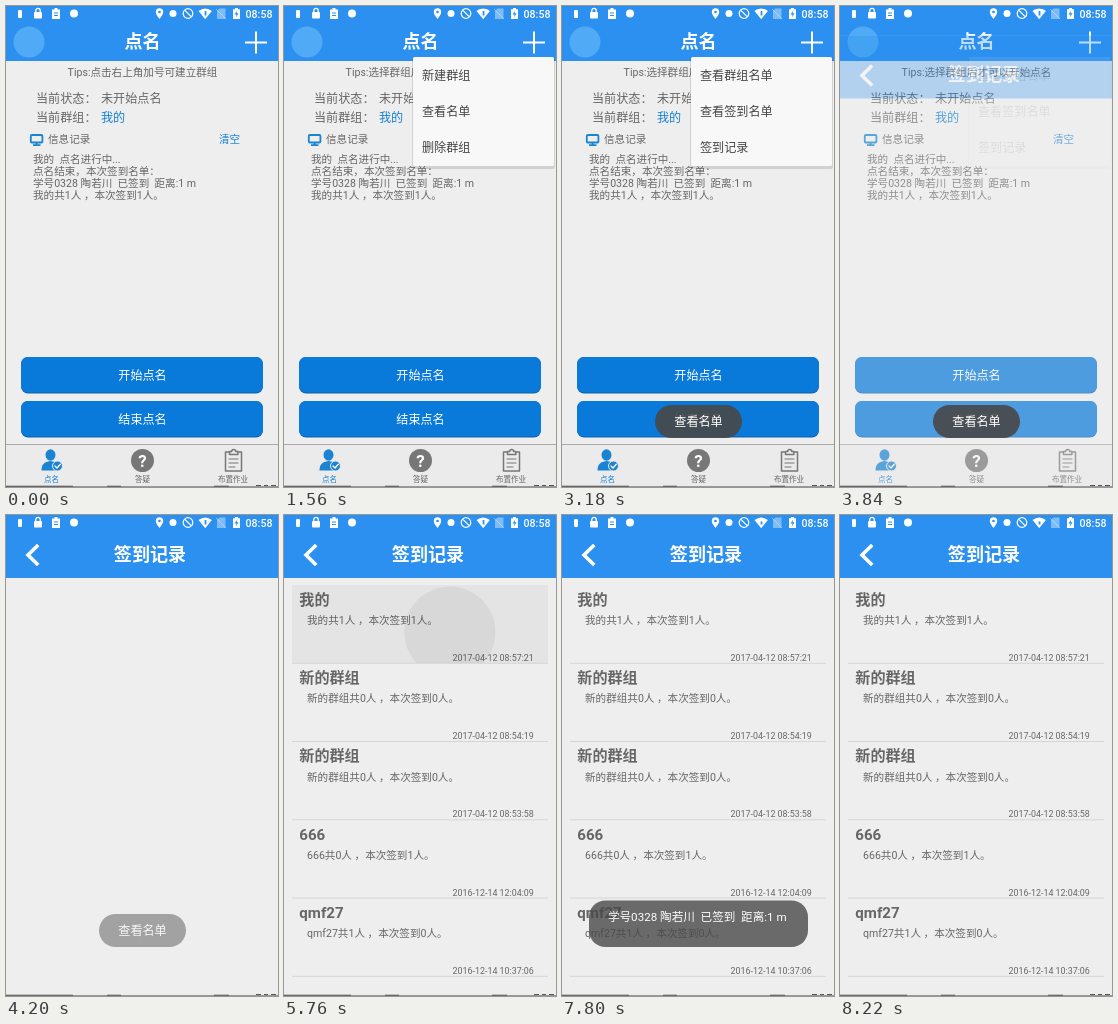
Recreate the animation shown at these times as an HTML page. Size 272 by 481 pixels, loop 8.76 s.

```html
<!DOCTYPE html>
<html lang="zh-CN">
<head>
<meta charset="utf-8">
<title>点名</title>
<style>
html, body { margin: 0; width: 100%; height: 100%; overflow: hidden; background: #eee; }
svg { display: block; width: 272px; height: 481px; }
text { font-family: Roboto, "Noto Sans CJK SC", "Noto Sans CJK", sans-serif; fill: #666; white-space: pre; }
.mid { text-anchor: middle; }
.title { font-size: 18.1px; font-weight: 700; fill: #fff; }
.label { font-size: 12.1px; }
.small { font-size: 10.58px; }
.tab { font-size: 7.56px; }
.group { font-size: 15.1px; font-weight: 700; }
.date { font-size: 8.9px; }
.blue { fill: #1580d6; }
.white { fill: #fff; }
.menu { font-size: 12.1px; fill: #444; }
.line { fill: none; stroke-linecap: round; stroke-linejoin: round; }
</style>
</head>
<body>
<svg viewBox="0 0 272 481">
  <defs><clipPath id="rowClip"><rect x="8" y="70" width="256" height="78"/></clipPath></defs>

  <g id="home">
    <rect width="272" height="481" fill="#eee"/>
    <rect width="272" height="55" fill="#2b90ef"/>
    <circle cx="23" cy="36" r="15.5" fill="#50aaf6"/>
    <text class="title mid" x="136.5" y="42">点名</text>
    <path d="M239 36.5h22M250 25.5v22" stroke="#fff" stroke-width="2"/>
    <text id="tip" class="small mid" x="136.5" y="70"></text>
    <text class="label" x="30" y="96.7">当前状态：</text>
    <text class="label" x="95" y="96.7">未开始点名</text>
    <text class="label" x="30" y="115.5">当前群组：</text>
    <text class="label blue" x="95" y="115.5">我的</text>
    <rect x="24.8" y="129" width="11.6" height="7.5" rx="1" fill="none" stroke="#1786cf" stroke-width="1.8"/>
    <path d="M27 139.2h7.5M30.6 137v2" stroke="#1786cf" stroke-width="1.8"/>
    <text class="small" x="42" y="137.3">信息记录</text>
    <text class="small blue" x="213" y="137.3">清空</text>
    <g id="log"></g>
    <g id="buttons"></g>
    <rect y="438" width="272" height="43" fill="#ebebeb"/>
    <path d="M0 438.5h272" stroke="#a9a9a9"/>
    <g fill="#1b84d2">
      <ellipse cx="44.5" cy="449" rx="5" ry="5.8"/>
      <path d="M35.5 464.5c0-6 2.5-8.5 9-9.5 5 .6 8 2.5 9 6v3.5z"/>
      <circle cx="51.5" cy="460" r="5" stroke="#ebebeb"/>
      <path class="line" d="M49 460l2 2 3.3-3.8" stroke="#fff" stroke-width="1.3"/>
    </g>
    <circle cx="136.5" cy="454.5" r="11.5" fill="#777"/>
    <text class="mid white" x="136.5" y="460.5" font-size="17" font-weight="700">?</text>
    <g class="line" stroke="#777" stroke-width="1.5">
      <path d="M223 446h-3.5v19h16v-19h-3.5M223.5 448.5v-3h2.2a2 2 0 0 1 4 0h2.2v3z"/>
      <path d="M223 453h9M223 457h9M223 461h6" stroke-width="1.2"/>
    </g>
    <text class="tab mid blue" x="45.5" y="475.7">点名</text>
    <text class="tab mid" x="136.5" y="475.7">答疑</text>
    <text class="tab mid" x="227" y="475.7">布置作业</text>
  </g>

  <g id="menuA"></g>
  <g id="menuB"></g>

  <g id="records">
    <rect width="272" height="481" fill="#eee"/>
    <rect width="272" height="63" fill="#2b90ef"/>
    <path d="M32.2 30L22 40l10.2 10" fill="none" stroke="#fff" stroke-width="3.6"/>
    <text class="title mid" x="144" y="46">签到记录</text>
    <g id="list"></g>
    <g id="press" clip-path="url(#rowClip)">
      <rect x="8" y="70" width="256" height="78" fill="#000" opacity=".045"/>
      <circle id="ripple" cx="165.8" cy="117" fill="#000" opacity=".055"/>
    </g>
  </g>

  <g id="toastA">
    <rect x="93" y="399" width="87" height="33" rx="16.5" fill="#484848" fill-opacity=".9"/>
    <text class="label mid white" x="136.5" y="419.8">查看名单</text>
  </g>
  <g id="toastB">
    <rect x="27" y="385.5" width="219" height="46.5" rx="16.5" fill="#484848" fill-opacity=".9"/>
    <text id="toastText" class="mid white" x="135.3" y="406.3" font-size="11.6"></text>
  </g>

  <g id="status" fill="#fff">
    <rect x="12" y="4" width="4" height="8" rx="1"/>
    <rect x="28" y="6" width="8" height="6.5" rx="1"/>
    <path d="M29.8 6.5V4.5a2.2 2.2 0 0 1 4.4 0v2" fill="none" stroke="#fff" stroke-width="1.3"/>
    <path d="M46 3.5h2.5V2h3v1.5H54v9.5h-8z"/>
    <path d="M48 7h4M48 9.5h4" stroke="#2b90ef"/>
    <circle cx="68" cy="7.5" r="4"/>
    <path d="M153.5 13c-2.5-3.5-3.7-5-3.7-7a3.7 3.7 0 0 1 7.4 0c0 2-1.2 3.5-3.7 7z"/>
    <circle cx="153.5" cy="6" r="1.3" fill="#2b90ef"/>
    <circle cx="167" cy="7.5" r="3.5"/>
    <circle cx="182" cy="7.5" r="4.8" fill="none" stroke="#fff" stroke-width="1.2"/>
    <path d="M178.6 4.1l6.8 6.8" stroke="#fff" stroke-width="1.2"/>
    <path d="M192.5 5q6.7-5 13.4 0l-6.7 8.3z"/>
    <path id="wifi" stroke="#2b90ef" stroke-width="1.8"/>
    <path d="M211 5l2.5-2.5h6V13H211z" opacity=".4"/>
    <path d="M210 3l10 10" stroke="#fff" opacity=".4"/>
    <path d="M227 3.3h2V2h3v1.3h2V13h-7z"/>
    <path d="M231.2 4.5l-2.7 4h2l-.7 3 2.8-4.2h-2z" fill="#2b90ef"/>
    <text class="white" x="239.6" y="11.7" font-size="10.58" font-weight="500">08:58</text>
  </g>
  <path d="M0 480.5h272" stroke="#999"/>
  <path d="M0 480.2h67M101 480.2h14M208 480.2h15M250 479.5h5M258 479.5h4M265 479.5h5" stroke="#555"/>
</svg>

<script>
const LOOP = 8760, STEP = 60;
const $ = id => document.getElementById(id);
const text = (cls, x, y, s) => `<text class="${cls}" x="${x}" y="${y}">${s}</text>`;
const ramp = (t, a, b) => Math.min(1, Math.max(0, (t - a) / (b - a)));
const fade = (id, v) => $(id).setAttribute("opacity", v);

const signIn = "学号0328 陶若川  已签到  距离:1 m";
const tips = ["Tips:点击右上角加号可建立群组", "Tips:选择群组后才可以开始点名"];
$("toastText").textContent = signIn;

$("log").innerHTML = [
  "我的  点名进行中...", "点名结束，本次签到名单：", signIn, "我的共1人 ，本次签到1人。"
].map((s, i) => text("small", 27, 157 + i * 12, s)).join("");

$("buttons").innerHTML = ["开始点名", "结束点名"].map((s, i) => {
  const y = 351 + i * 44;
  return `<rect x="15" y="${y}" width="242" height="36.5" rx="7" fill="#0a62b4"/>
    <rect x="15" y="${y}" width="242" height="35.5" rx="7" fill="#0979da"/>` +
    text("label mid white", 136.5, y + 22.5, s);
}).join("");

const rows = [
  ["我的", 1, 1, "2017-04-12 08:57:21"],
  ["新的群组", 0, 0, "2017-04-12 08:54:19"],
  ["新的群组", 0, 0, "2017-04-12 08:53:58"],
  ["666", 0, 1, "2016-12-14 12:04:09"],
  ["qmf27", 1, 0, "2016-12-14 10:37:06"]
];
$("list").innerHTML = rows.map(([name, size, signed, date], i) => {
  const y = i * 78.25;
  return text("group", 15.3, 89.9 + y, name) +
    text("small", 23, 109.2 + y, `${name}共${size}人 ，本次签到${signed}人。`) +
    text("date", 168.6, 145.9 + y, date) +
    `<path d="M8 ${148.3 + y}h256" stroke="#d6d6d6"/>`;
}).join("");

function buildMenu(id, items) {
  $(id).innerHTML = `<rect x="128" y="52" width="143" height="111" rx="2" fill="#000" opacity=".12"/>
    <rect x="129" y="51" width="141" height="109" rx="1.5" fill="#f8f8f8"/>
    <rect class="hot" x="130" y="87" width="140" height="36" fill="#d8d8d8" opacity="0"/>` +
    items.map((s, i) => text("menu", 138, 73.5 + i * 36, s)).join("");
}
buildMenu("menuA", ["新建群组", "查看名单", "删除群组"]);
buildMenu("menuB", ["查看群组名单", "查看签到名单", "签到记录"]);
const hot = document.querySelector("#menuA .hot");

function draw(t) {
  $("tip").textContent = tips[t < 1080 ? 0 : 1];

  fade("menuA", ramp(t, 300, 600) * (1 - ramp(t, 1980, 2220)));
  hot.setAttribute("opacity", t >= 1860 ? 1 : 0);
  fade("menuB", ramp(t, 3000, 3180) * (1 - ramp(t, 3780, 3850)));

  // The new page rises and fades in.
  const p = ramp(t, 3780, 4140);
  fade("records", Math.min(1, p * 1.8));
  $("records").setAttribute("transform", `translate(0 ${38 * (1 - p) ** 1.4})`);
  fade("list", t >= 4260 ? 1 : 0);

  fade("press", t >= 5760 ? 1 - ramp(t, 5880, 6120) : 0);
  $("ripple").setAttribute("r", 45.5 + Math.max(0, t - 5760) * .6);

  fade("toastA", ramp(t, 2040, 2460) * (1 - ramp(t, 4020, 4380)));
  fade("toastB", ramp(t, 5880, 6300) * (1 - ramp(t, 7740, 8220)));
  $("wifi").setAttribute("d", t < 7020 ? "M199.5 5v4.5" : "M199.5 6.5v3");
}

function tick() {
  const t = performance.now() % LOOP;
  draw(Math.floor(t / STEP) * STEP);
  requestAnimationFrame(tick);
}
tick();
</script>
</body>
</html>
```
